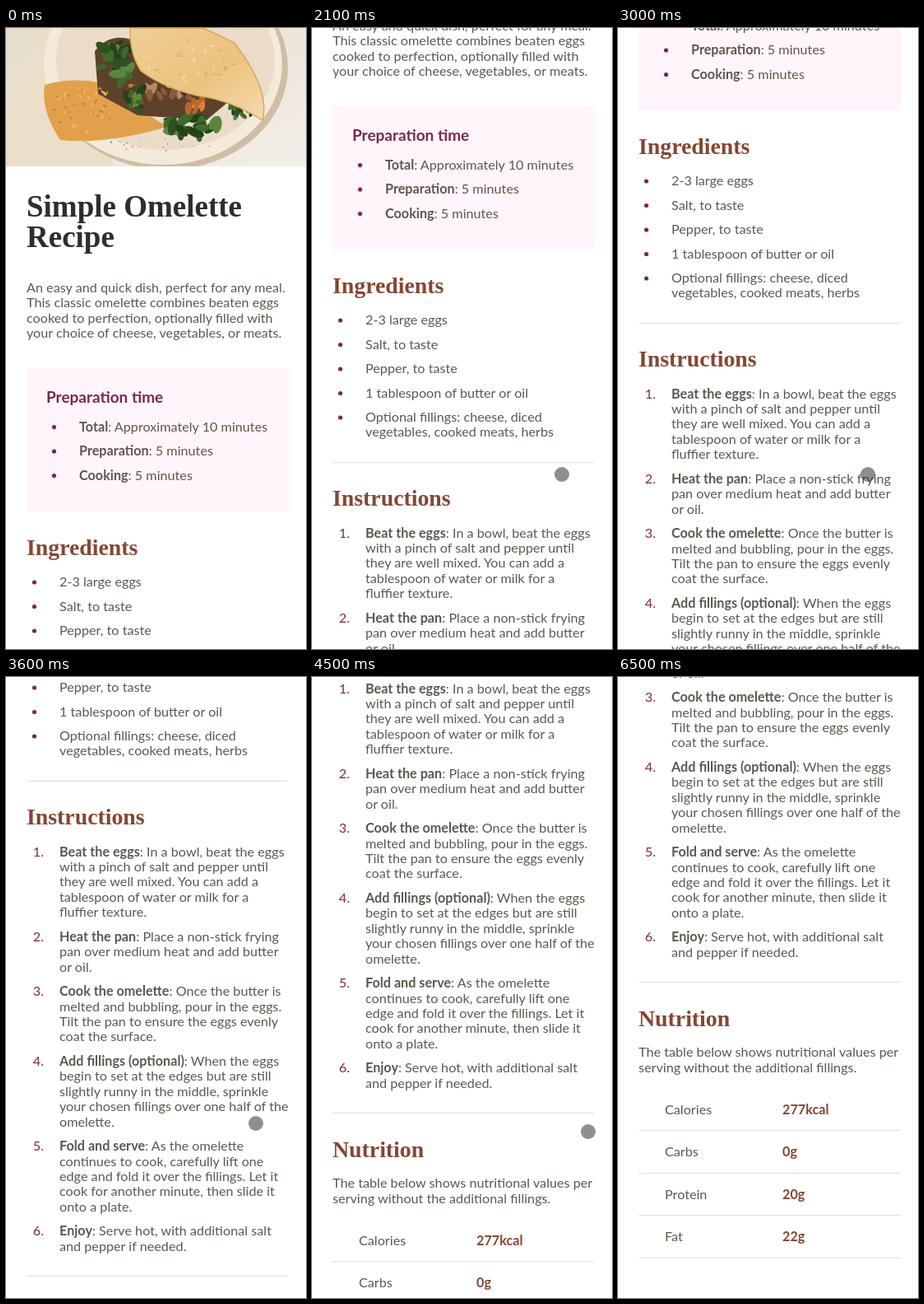
These frames come from a looping animation (365x754 px, 7400 ms). An HTML page:

```html
<!DOCTYPE html>
<html lang="en">
<head>
<meta charset="utf-8">
<title>Simple Omelette Recipe</title>
<style>
  html, body { margin: 0; width: 100%; height: 100%; overflow: hidden; background: #fff; }
  svg { display: block; width: 100%; height: 100%; }
  text { font: 400 16.2px Lato, "Open Sans", sans-serif; fill: #5f574e; }
  .bold { font-weight: 700; }
  .title { font: 700 37px "Liberation Serif", serif; fill: #302d2c; }
  .head { font: 700 27.8px "Liberation Serif", serif; fill: #854632; }
  .sub { font-size: 19px; font-weight: 700; fill: #7b284f; }
  .num { text-anchor: end; fill: #7b3030; }
  .value { font-weight: 700; fill: #854632; }
  .dot { fill: #7b284f; }
  .rule { fill: #e2ddd8; }
</style>
</head>
<body>
<svg viewBox="0 0 365 754">
  <defs>
    <clipPath id="photo"><rect width="365" height="168"/></clipPath>
    <linearGradient id="marble" x2="1" y2="1">
      <stop offset="0" stop-color="#e6dccb"/>
      <stop offset="1" stop-color="#f3eee8"/>
    </linearGradient>
    <linearGradient id="egg" x2="1" y2="1">
      <stop offset="0" stop-color="#efcf94"/>
      <stop offset=".55" stop-color="#ecc27e"/>
      <stop offset="1" stop-color="#f3dcae"/>
    </linearGradient>
  </defs>
  <g id="page">
    <g clip-path="url(#photo)">
      <rect width="365" height="168" fill="url(#marble)"/>
      <path d="M0 108 50 0H110L130 168H0Z" fill="#ebdfca"/>
      <ellipse cx="196" cy="48" rx="147" ry="124" fill="#cfbea5"/>
      <ellipse cx="191" cy="44" rx="145" ry="122" fill="#f4eadb"/>
      <ellipse cx="194" cy="39" rx="133" ry="109" fill="#eadcc8"/>
      <path d="M47 69Q80 60 112 66L196 120Q120 142 66 136 42 100 47 69Z" fill="#e3a04c"/>
      <path d="M108 28Q126 6 152 14L196 72 270 90 244 112 160 106 112 80Z" fill="#5d4229"/>
      <g id="filling"></g>
      <path d="M151 0Q150 30 164 52 190 72 232 82 276 88 312 112 322 76 278 18L240 0Z"
        fill="url(#egg)" stroke="#d9a75c" stroke-width="1.5"/>
      <g id="specks"></g>
    </g>
  </g>
  <circle id="pointer" r="9" fill="#333" opacity=".55"/>
</svg>
<script>
const LOOP = 7400, TICK = 100, LINE = 18.4;
const page = document.getElementById('page');
const pointer = document.getElementById('pointer');

function add(tag, attrs, parent = page) {
  const el = document.createElementNS('http://www.w3.org/2000/svg', tag);
  for (const key in attrs) el.setAttribute(key, attrs[key]);
  parent.append(el);
  return el;
}

let seed = 7;
const random = () => (seed = seed * 16807 % 2147483647) / 2147483647;

// Small ellipses spread at random inside a larger one.
function scatter(id, count, [cx, cy, rx, ry], size, colors) {
  const parent = document.getElementById(id);
  for (let i = 0; i < count; i++) {
    const angle = random() * 2 * Math.PI, dist = Math.sqrt(random());
    const x = cx + rx * dist * Math.cos(angle);
    const y = cy + ry * dist * Math.sin(angle);
    const r = size * (0.6 + random() * 0.6);
    add('ellipse', {
      cx: x, cy: y, rx: r, ry: r * 0.5, fill: colors[i % colors.length],
      transform: `rotate(${random() * 180} ${x} ${y})`
    }, parent);
  }
}

function garnish() {
  const greens = ['#2f5122', '#3f6a2c', '#24411b', '#5b8640'];
  scatter('filling', 18, [178, 84, 46, 14], 8, ['#8a5a3c', '#d17a35', '#b08a6c', '#4a3222']);
  scatter('filling', 26, [132, 42, 22, 26], 9, greens);
  scatter('filling', 10, [158, 88, 16, 14], 8, greens);
  scatter('filling', 26, [226, 121, 36, 13], 10, greens);
  scatter('filling', 18, [280, 101, 24, 12], 6, greens);
  scatter('filling', 8, [236, 96, 16, 8], 8, ['#d9803a', '#b9652c']);
  scatter('specks', 40, [98, 98, 42, 30], 2.5, ['#cc8536', '#edb564']);
  scatter('specks', 30, [225, 42, 58, 28], 2.5, ['#dfae66', '#f3d9a5']);
  scatter('specks', 18, [190, 141, 70, 8], 1.2, ['#a89372', '#8d8a5c']);
}

// Text before "|" is set in bold.
function label(x, y, str, cls = '') {
  const el = add('text', { x, y: Math.round(y), class: cls });
  const cut = str.indexOf('|');
  if (cut > 0) add('tspan', { class: 'bold' }, el).textContent = str.slice(0, cut);
  el.append(str.slice(cut + 1));
}

function lines(x, y, list) {
  list.forEach((str, i) => label(x, y + i * LINE, str));
}

const rule = y => add('rect', { x: 25, y, width: 318, height: 1, class: 'rule' });
const dot = (cx, cy) => add('circle', { cx, cy, r: 2.6, class: 'dot' });

function bullets(x, y, list) {
  list.forEach((str, i) => {
    const base = y + i * 29.5;
    dot(x - 30.5, base - 5);
    lines(x, base, str.split('/'));
  });
}

function build() {
  label(25, 229, 'Simple Omelette', 'title');
  label(25, 266, 'Recipe', 'title');
  lines(25, 321, [
    'An easy and quick dish, perfect for any meal.',
    'This classic omelette combines beaten eggs',
    'cooked to perfection, optionally filled with',
    'your choice of cheese, vegetables, or meats.'
  ]);

  add('rect', { x: 25, y: 413, width: 319, height: 174, fill: '#fff5fa' });
  label(49, 455, 'Preparation time', 'sub');
  bullets(89, 489.6, [
    'Total|: Approximately 10 minutes',
    'Preparation|: 5 minutes',
    'Cooking|: 5 minutes'
  ]);

  label(25, 640, 'Ingredients', 'head');
  bullets(65, 678, [
    '2-3 large eggs',
    'Salt, to taste',
    'Pepper, to taste',
    '1 tablespoon of butter or oil',
    'Optional fillings: cheese, diced/vegetables, cooked meats, herbs'
  ]);
  rule(845);

  label(25, 898, 'Instructions', 'head');
  let y = 936.5;
  [
    'Beat the eggs|: In a bowl, beat the eggs/with a pinch of salt and pepper until/they are well mixed. You can add a/tablespoon of water or milk for a/fluffier texture.',
    'Heat the pan|: Place a non-stick frying/pan over medium heat and add butter/or oil.',
    'Cook the omelette|: Once the butter is/melted and bubbling, pour in the eggs./Tilt the pan to ensure the eggs evenly/coat the surface.',
    'Add fillings (optional)|: When the eggs/begin to set at the edges but are still/slightly runny in the middle, sprinkle/your chosen fillings over one half of the/omelette.',
    'Fold and serve|: As the omelette/continues to cook, carefully lift one/edge and fold it over the fillings. Let it/cook for another minute, then slide it/onto a plate.',
    'Enjoy|: Serve hot, with additional salt/and pepper if needed.'
  ].forEach((step, i) => {
    const rows = step.split('/');
    label(46, y, `${i + 1}.`, 'num');
    lines(65, y, rows);
    y += rows.length * LINE + 11.2;
  });
  rule(1446);

  label(25, 1500, 'Nutrition', 'head');
  lines(25, 1537.4, [
    'The table below shows nutritional values per',
    'serving without the additional fillings.'
  ]);
  [['Calories', '277kcal'], ['Carbs', '0g'], ['Protein', '20g'], ['Fat', '22g']]
    .forEach(([name, amount], i) => {
      const base = 1606.5 + i * 51.6;
      label(57, base, name);
      label(200, base, amount, 'value');
      rule(Math.round(1626 + i * 51.6));
    });
}

const clamp = p => Math.min(1, Math.max(0, p));
const easeOut = p => 1 - (1 - p) ** 3;
const easeInOut = p => p * p * (3 - 2 * p);

// Each wheel notch glides the page by the same distance.
const NOTCH = 120, GLIDE = 320, MAX_SCROLL = 1076;
const notches = [905, 1625, 2005, 2490, 2994, 3344, 3705, 4407, 4805];

function scrollAt(t) {
  const turned = notches.reduce((sum, start) => sum + easeOut(clamp((t - start) / GLIDE)), 0);
  return Math.min(MAX_SCROLL, Math.round(turned * NOTCH));
}

const home = { x: 206, y: 775 };
const moves = [
  { start: 0, end: 600, x: 304, y: 542 },
  { start: 4200, end: 4400, x: 336, y: 552 },
  { start: 6100, end: 6500, x: 209, y: 790 }
];

function pointerAt(t) {
  let { x, y } = home;
  for (const move of moves) {
    const k = easeInOut(clamp((t - move.start) / (move.end - move.start)));
    x += (move.x - x) * k;
    y += (move.y - y) * k;
  }
  return { x, y };
}

function draw(ms) {
  const t = Math.floor((ms % LOOP) / TICK) * TICK;
  const { x, y } = pointerAt(t);
  page.setAttribute('transform', `translate(0 ${-scrollAt(t)})`);
  pointer.setAttribute('cx', x);
  pointer.setAttribute('cy', y);
}

garnish();
build();
draw(0);
let start;
requestAnimationFrame(function frame(now) {
  start ??= now;
  draw(now - start);
  requestAnimationFrame(frame);
});
</script>
</body>
</html>
```
